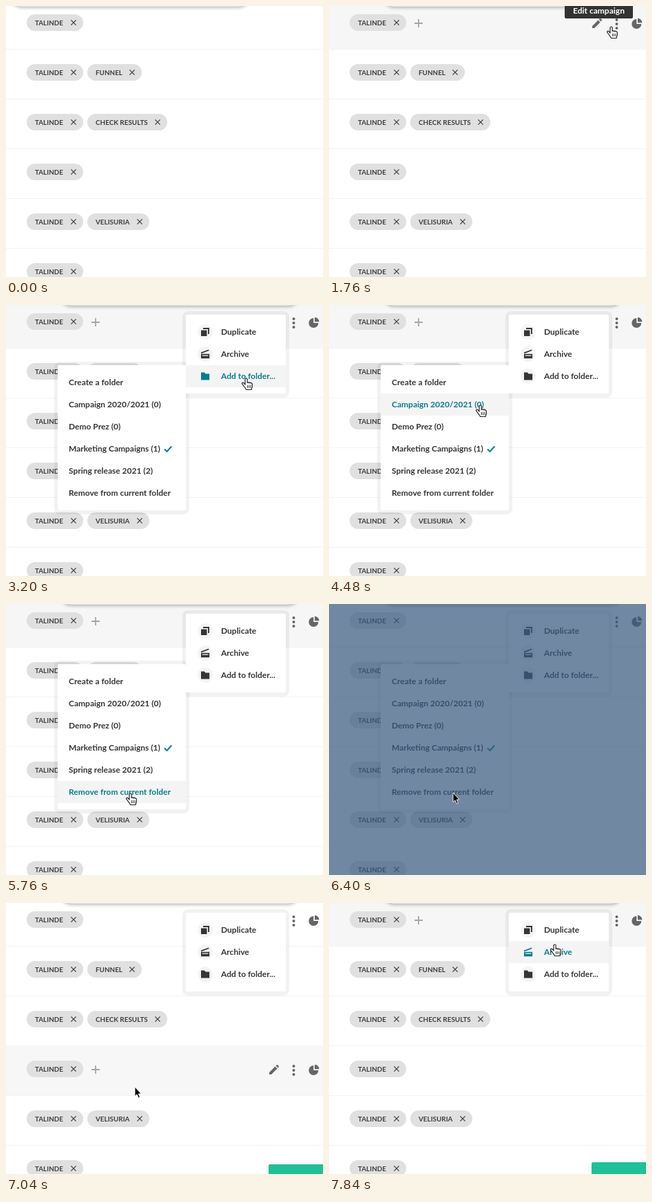
Animation of 460 by 392 pixels, one loop 8 s. Source, as an HTML page:

```html
<!DOCTYPE html>
<html lang="en">
<head>
<meta charset="utf-8">
<title>Campaign list</title>
<style>
  html, body { margin: 0; width: 100%; height: 100%; overflow: hidden; background: #fff; }
  svg { display: block; }
  #stage { width: 460px; height: 392px; overflow: hidden; }
  text { font: 700 12px Lato, sans-serif; fill: currentColor; }
  .tag { color: #3f3f3f; }
  .tag text { font-size: 9.9px; }
  .line { fill: none; stroke: currentColor; }
  .tools { color: #666; }
  .ring { fill: #000; fill-opacity: .05; filter: blur(.7px); }
  .item { color: #333638; }
  .hot { color: #087d90; }

  /* 2% of the loop is one 160 ms step */
  .t, .cursor, .bar, .toast { animation: 8s step-end infinite; }
  .t { visibility: hidden; }
  .bar { animation-name: bar; filter: drop-shadow(0 2px 2px rgba(0,0,0,.25)); }
  .toast { animation-name: toast; visibility: hidden; }
  .cursor { animation-name: move; }

  @keyframes bar {
    0% { transform: translateX(0); }
    2% { transform: translateX(18px); }
    4% { transform: translateX(36px); }
    6% { transform: translateX(54px); }
    8%, 100% { transform: translateX(72px); }
  }
  @keyframes move {
    0%, 16% { transform: translate(345px, 38px); }
    18% { transform: translate(389px, 26px); }
    22% { transform: translate(410px, 30px); }
    24% { transform: translate(417px, 28px); }
    34% { transform: translate(411px, 50px); }
    36% { transform: translate(388px, 78px); }
    38% { transform: translate(360px, 99px); }
    40% { transform: translate(349px, 106px); }
    50% { transform: translate(318px, 107px); }
    52% { transform: translate(285px, 109px); }
    54% { transform: translate(250px, 118px); }
    56% { transform: translate(220px, 145px); }
    58% { transform: translate(195px, 180px); }
    60% { transform: translate(180px, 207px); }
    68% { transform: translate(181px, 232px); }
    70% { transform: translate(181px, 260px); }
    72% { transform: translate(181px, 274px); }
    80% { transform: translate(180px, 273px); }
    88% { transform: translate(187px, 266px); }
    90% { transform: translate(333px, 38px); }
    94% { transform: translate(331px, 46px); }
    96% { transform: translate(329px, 56px); }
    98%, 100% { transform: translate(328px, 60px); }
  }
  @keyframes toast {
    88% { visibility: visible; transform: translateY(3px); }
    90%, 100% { visibility: visible; transform: none; }
  }
  @keyframes arrow {
    16% { visibility: visible; } 18% { visibility: hidden; }
    80% { visibility: visible; } 90% { visibility: hidden; }
  }
  @keyframes hand {
    18% { visibility: visible; } 80% { visibility: hidden; }
    90%, 100% { visibility: visible; }
  }
  @keyframes tools { 16%, 100% { visibility: visible; } }
  @keyframes rowA {
    16% { visibility: visible; } 80% { visibility: hidden; }
    90%, 100% { visibility: visible; }
  }
  @keyframes rowB { 88% { visibility: visible; } 90% { visibility: hidden; } }
  @keyframes tip { 18% { visibility: visible; } 24% { visibility: hidden; } }
  @keyframes menu { 30%, 100% { visibility: visible; } }
  @keyframes sub { 38% { visibility: visible; } 84% { visibility: hidden; } }
  @keyframes dim { 80% { visibility: visible; } 88% { visibility: hidden; } }

  @keyframes duplicate { 90% { visibility: visible; } 96% { visibility: hidden; } }
  @keyframes archive {
    36% { visibility: visible; } 38% { visibility: hidden; }
    96%, 100% { visibility: visible; }
  }
  @keyframes add { 38% { visibility: visible; } 54% { visibility: hidden; } }
  @keyframes create { 54% { visibility: visible; } 56% { visibility: hidden; } }
  @keyframes campaign { 56% { visibility: visible; } 58% { visibility: hidden; } }
  @keyframes demo { 58% { visibility: visible; } 60% { visibility: hidden; } }
  @keyframes marketing { 60% { visibility: visible; } 68% { visibility: hidden; } }
  @keyframes spring { 68% { visibility: visible; } 70% { visibility: hidden; } }
  @keyframes remove { 70% { visibility: visible; } 80% { visibility: hidden; } }
</style>
</head>
<body>
<svg id="stage" width="460" height="392" viewBox="0 0 460 392">
  <defs>
    <g id="cross"><path class="line" stroke-width="1.3" d="M-3.6-3.6l7.2 7.2M3.6-3.6l-7.2 7.2"/></g>
    <g id="plus"><path class="line" color="#a6a6a6" stroke-width="1.8" d="M124 25h12M130 19v12"/></g>
    <g id="icons" fill="currentColor">
      <path d="M382 32v-3l8.6-8.6 3 3L385 32zM391.6 19.4l1.3-1.2q.7-.6 1.4 0l1.5 1.5q.6.7 0 1.4l-1.2 1.3z"/>
      <circle cx="417.5" cy="20" r="2"/><circle cx="417.5" cy="26" r="2"/><circle cx="417.5" cy="32" r="2"/>
      <path d="M446.3 19v7h7a7 7 0 1 1-7-7zM448 17.8a6.6 6.6 0 0 1 6.4 6.5H448z"/>
    </g>
    <g id="duplicate" fill="currentColor"><path d="M-6-2.5h8.5V6H-6zM-3-6H6v9H4.1v-7.1H-3z"/></g>
    <g id="archive" fill="currentColor"><path d="M-6.2-2.4L5-6.6l.6 1.6L-5.6-.8zM-6-.2H6.2V6.2H-6zM-4.2 1.6v1.2h8.6V1.6z" fill-rule="evenodd"/></g>
    <g id="add" fill="currentColor"><path d="M-6-5.4h5l1.4 2H6.2V5.6H-6z"/></g>
  </defs>

  <rect width="460" height="392" fill="#fff"/>
  <rect class="t" style="animation-name:rowA" width="460" height="62" fill="#f6f6f6"/>
  <rect class="t" style="animation-name:rowB" y="206" width="460" height="72" fill="#f7f7f7"/>
  <path class="line" color="#f3f3f3" d="M0 62.5h460M0 134.5h460M0 206.5h460M0 278.5h460M0 350.5h460"/>

  <g class="tools">
    <use class="t" style="animation-name:rowA" href="#plus"/>
    <use class="t" style="animation-name:tools" href="#icons"/>
    <g class="t" style="animation-name:rowB">
      <use href="#plus" y="216"/><use href="#icons" y="216"/>
    </g>
  </g>
  <g id="tags"></g>

  <rect class="bar" x="4" y="-59" width="352" height="60" rx="20" fill="#e6e6e6"/>

  <g class="t" style="animation-name:sub"><rect class="ring" x="70" y="82" width="196" height="221" rx="8"/></g>
  <g class="t" style="animation-name:menu"><rect class="ring" x="256" y="9" width="155" height="125" rx="8"/></g>
  <g id="sub" class="t" style="animation-name:sub"><rect x="75" y="87" width="186" height="210" rx="2" fill="#fff"/></g>
  <g id="menu" class="t" style="animation-name:menu"><rect x="261" y="14" width="145" height="114" rx="2" fill="#fff"/></g>

  <g class="t" style="animation-name:tip" color="#fff">
    <rect x="342" y="-4" width="99" height="22" rx="2" fill="#333"/>
    <text x="354" y="11">Edit campaign</text>
  </g>
  <rect class="toast" x="381" y="375" width="90" height="30" rx="2" fill="#20c197"/>
  <rect class="t" style="animation-name:dim" width="460" height="392" fill="rgb(58,90,126)" fill-opacity=".72"/>

  <g class="cursor">
    <path class="t" style="animation-name:arrow" d="M0 0v13.6l3-2.8 2.2 5 2.2-1-2.2-4.8h4z" fill="#000" stroke="#fff" stroke-width=".9"/>
    <g class="t" style="animation-name:hand" stroke="#222" stroke-width="1.2" stroke-linejoin="round">
      <path fill="#fff" d="M-2 9V1.6a1.6 1.6 0 0 1 3.2 0V6.5c0-1 2.4-1 2.6.3.4-1 2.3-.8 2.5.4.6-.7 2-.3 2 1v3.5c0 2-1.2 2.6-1.2 4.8H-.5c-.3-2-2.2-3-3.4-5.2-.9-1.6-2.4-2.8-2.6-3.8-.1-1.3 1.4-1.7 2.4-.8z"/>
      <path stroke-width=".9" d="M1.5 10v4M3.7 10v4M5.9 10v4"/>
    </g>
  </g>
</svg>
<script>
  const add = (id, markup) =>
    document.getElementById(id).insertAdjacentHTML('beforeend', markup);

  // Tags: label and pill width, one list per row
  const first = ['TALINDE', 82];
  const rows = [
    [first],
    [first, ['FUNNEL', 79]],
    [first, ['CHECK RESULTS', 116]],
    [first],
    [first, ['VELISURIA', 90]],
    [first]
  ];
  rows.forEach((row, r) => {
    let x = 30;
    for (const [label, w] of row) {
      add('tags', `<g class="tag" transform="translate(${x} ${12 + 72 * r})">
        <rect width="${w}" height="24" rx="12" fill="#e0e0e0"/>
        <text x="12" y="15.7">${label}</text>
        <use href="#cross" x="${w - 14}" y="12"/></g>`);
      x += w + 6;
    }
  });

  // Each entry is drawn plain, then again as its highlighted state
  function addItem(menu, name, content, x, y, w) {
    const box = `<rect x="${x}" y="${y}" width="${w}" height="32" fill="#f4f4f4"/>`;
    add(menu, `<g class="item">${content}</g>
      <g class="t hot" style="animation-name:${name}">${box}${content}</g>`);
  }

  [['duplicate', 'Duplicate'], ['archive', 'Archive'], ['add', 'Add to folder...']]
    .forEach(([name, label], i) => {
      const y = 23 + 32 * i;
      addItem('menu', name, `<circle cx="289" cy="${y + 16}" r="11" fill="#f4f4f4"/>
        <use href="#${name}" x="289" y="${y + 16}"/>
        <text x="312" y="${y + 20}">${label}</text>`, 261, y, 145);
    });

  const check = '<path class="line" color="#087d90" stroke-width="2" d="M230 208.5l3.5 3.5 6.7-7.5"/>';
  [['create', 'Create a folder'], ['campaign', 'Campaign 2020/2021 (0)'],
   ['demo', 'Demo Prez (0)'], ['marketing', 'Marketing Campaigns (1)', check],
   ['spring', 'Spring release 2021 (2)'], ['remove', 'Remove from current folder']]
    .forEach(([name, label, extra = ''], i) => {
      const y = 96 + 32 * i;
      addItem('sub', name, `<text x="91" y="${y + 20}">${label}</text>${extra}`, 75, y, 186);
    });
</script>
</body>
</html>
```
